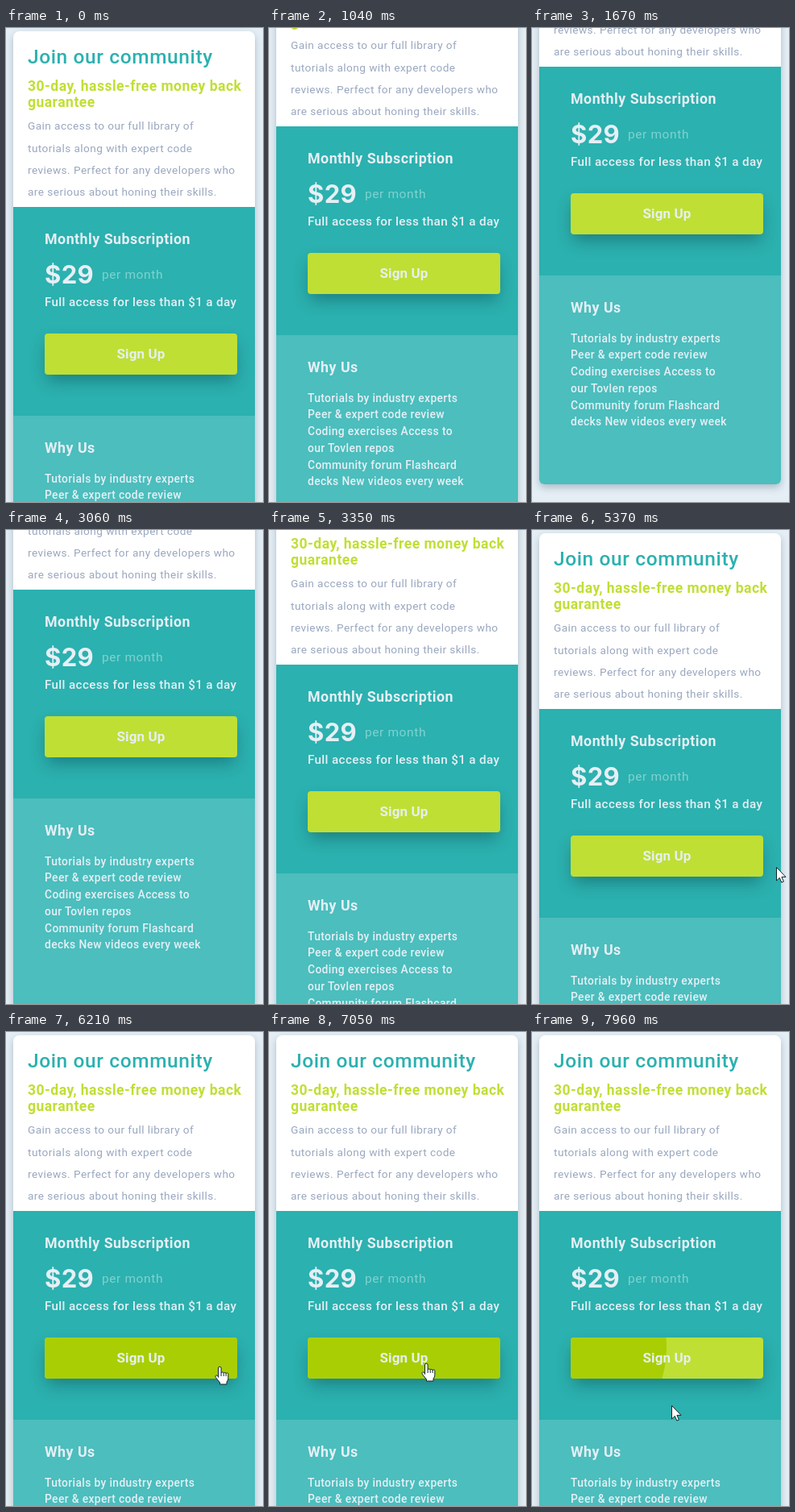
An HTML page for the animation above (8 s loop, 319 by 588 pixels).

```html
<!DOCTYPE html>
<html lang="en">
<head>
<meta charset="utf-8">
<title>Subscription card</title>
<style>
  html, body { margin: 0; width: 100%; height: 100%; overflow: hidden; background: #e5eef5; }
  body { position: relative; font-family: Roboto, "Liberation Sans", sans-serif; }
  #page { position: absolute; left: 0; top: 0; width: 319px; height: 762px; }
  #card {
    position: absolute; left: 9px; top: 4px; width: 300px; height: 736px; border-radius: 8px 8px 6px 6px;
    background: linear-gradient(#fff 218px, #2bb1af 218px 477px, #4bbebd 477px);
    box-shadow: 0 4px 10px rgba(20, 50, 75, .27);
  }
  p { position: absolute; left: 48px; margin: 0; line-height: 20px; white-space: nowrap; color: #e6eff5; }
  .title, .sub, .body { left: 27px; }
  .title { top: 26px; font-size: 24.5px; font-weight: 500; letter-spacing: .6px; color: #2bb1af; }
  .sub { top: 62px; font-size: 17.5px; font-weight: 700; letter-spacing: .48px; color: #bfdf34; }
  .body { top: 108.4px; font-size: 13.6px; line-height: 27.2px; letter-spacing: .45px; color: #99a7bf; }
  .head { font-size: 17.8px; font-weight: 700; letter-spacing: .5px; }
  .plan { top: 252px; }
  .why { top: 511px; }
  .price { top: 296px; font: 700 31px/20px Inter, Roboto, sans-serif; letter-spacing: .4px; }
  .per { left: 119px; top: 296px; font-size: 15.5px; letter-spacing: .6px; color: #7fd2d1; }
  .full { top: 330px; font-size: 15.2px; font-weight: 450; letter-spacing: .37px; }
  .list { top: 548.5px; font-size: 13.8px; font-weight: 450; line-height: 20.8px; letter-spacing: .37px; }
  #button {
    position: absolute; left: 48px; top: 379px; width: 239px; height: 51px; border-radius: 4px;
    background: #bfdf34; box-shadow: 0 10px 20px -3px rgba(0, 35, 50, .36);
    font-size: 17px; font-weight: 700; line-height: 51px; letter-spacing: .1px;
    text-align: center; color: #e6eff5;
  }
  #fill { position: absolute; inset: 0; border-radius: 4px; background: #a9ce04; }
  #button span { position: relative; }
  #cursor { position: absolute; left: 0; top: 0; width: 24px; height: 26px; overflow: visible; }
  #cursor path { fill: #fff; stroke: #10252c; stroke-width: 1; stroke-linejoin: round; }
</style>
</head>
<body>
<div id="page">
  <div id="card"></div>
  <p class="title">Join our community</p>
  <p class="sub">30-day, hassle-free money back<br>guarantee</p>
  <p class="body">Gain access to our full library of<br>tutorials along with expert code<br>reviews. Perfect for any developers who<br>are serious about honing their skills.</p>
  <p class="head plan">Monthly Subscription</p>
  <p class="price">$29</p>
  <p class="per">per month</p>
  <p class="full">Full access for less than $1 a day</p>
  <div id="button"><div id="fill"></div><span>Sign Up</span></div>
  <p class="head why">Why Us</p>
  <p class="list">Tutorials by industry experts<br>Peer &amp; expert code review<br>Coding exercises Access to<br>our Tovlen repos<br>Community forum Flashcard<br>decks New videos every week</p>
</div>
<svg id="cursor">
  <path id="arrow" d="M.5 .5V17L4.3 13.4 6.8 19.2 9.4 18.1 6.9 12.4H12Z"/>
  <g id="hand" transform="translate(-6.5 -1.5)">
    <path d="M5 14V2.5a1.8 1.8 0 0 1 3.6 0V8.5a1.6 1.6 0 0 1 3.1 .4a1.5 1.5 0 0 1 2.9 .5a1.4 1.4 0 0 1 2.7 .8V15q0 2.5-1.8 4.5V22.5H7V20.5L2 14.2q-1.5-2.3 .3-2.9q1.2-.3 2.7 2z"/>
    <path d="M8.6 8.5v4M11.7 9v3.5M14.6 9.5v3"/>
  </g>
</svg>
<script>
const $ = id => document.getElementById(id);
const LOOP = 8000, STEP = 70, PHASE = 50;
const ENTER = 4530;

// Everything advances on one steady beat.
const snap = t => Math.floor((t - PHASE) / STEP) * STEP + PHASE;

// Eased progress of a move that takes a number of beats.
function ease(t, start, beats) {
  const p = Math.min(1, Math.max(0, (t - start) / (beats * STEP)));
  return p * p * (3 - 2 * p);
}

// Pointer moves: start, beats, dx, dy
const moves = [
  [ENTER, 7, -20, 26],
  [5160, 3, 5, 6],
  [5510, 12, -41, -2],
  [6350, 12, -72, -4],
  [7190, 3, -8, 1],
  [7470, 7, -9, 50]
];

function pointer(t) {
  let x = 318, y = 386;
  for (const [start, beats, dx, dy] of moves) {
    const p = ease(t, start, beats);
    x += dx * p;
    y += dy * p;
  }
  return [Math.round(x), Math.round(y)];
}

function scrollAt(t) {
  const down = 100 * ease(t, 750, 4) + 74 * ease(t, 1380, 4);
  const up = 100 * ease(t, 2990, 3) + 74 * ease(t, 3270, 3);
  return Math.round(down - up);
}

function draw(time) {
  const t = snap(time % LOOP);
  const [x, y] = pointer(t);
  const over = x >= 48 && x < 287 && y >= 379 && y < 430;
  const fill = ease(t, 5860, 4) - ease(t, 7820, 4);

  $('page').style.transform = `translateY(${-scrollAt(t)}px)`;
  $('fill').style.clipPath = `circle(${15 + 248 * fill}px at -20px 12px)`;
  $('cursor').style.transform = `translate(${x}px, ${y}px)`;
  $('cursor').style.visibility = t < ENTER ? 'hidden' : 'visible';
  $('arrow').style.display = over ? 'none' : '';
  $('hand').style.display = over ? '' : 'none';
}

const start = performance.now();
function tick() {
  draw(performance.now() - start);
  requestAnimationFrame(tick);
}
tick();
</script>
</body>
</html>
```
